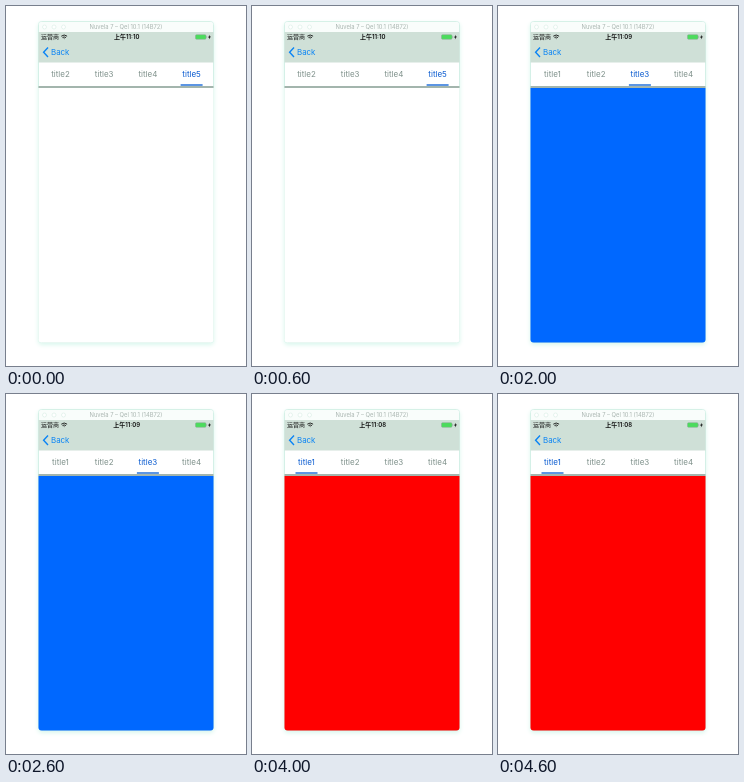
Recreate the animation shown at these times as an HTML page. Size 240 by 360 pixels, loop 5 s.

```html
<!DOCTYPE html>
<html lang="zh">
<head>
<meta charset="utf-8">
<style>
  html, body { margin: 0; width: 100%; height: 100%; overflow: hidden; background: #fff; }
  svg { display: block; width: 240px; height: 360px; font-family: Inter, "Noto Sans CJK SC", "Noto Sans CJK", sans-serif; }
  .window { fill: #fff; stroke: #cdeee2; stroke-width: .8; filter: drop-shadow(0 2px 2px #d9f7ed); }
  .title { font-size: 5.8px; fill: #a9b5b0; }
  .status { font-size: 6px; fill: #111; }
  .bold { font-weight: 600; }
  .back { font-size: 7.9px; fill: #0a84f5; }
  .tab { font-size: 8px; fill: #7f918b; }
  .tab.on { fill: #0b5cd0; }
  .mid { text-anchor: middle; }
</style>
</head>
<body>
<svg viewBox="0 0 240 360">
  <rect class="window" x="32.5" y="15.5" width="175" height="321" rx="3"/>
  <path d="M33 26V18.5q0-2.5 2.5-2.5H204.500q2.500 0 2.500 2.500V26z" fill="#f9fdfb"/>
  <g fill="#fff" stroke="#dcefe7" stroke-width=".7">
    <circle cx="38.500" cy="21" r="2"/><circle cx="48" cy="21" r="2"/><circle cx="57.500" cy="21" r="2"/>
  </g>
  <text class="title mid" x="120" y="23.300">Nuvela 7 – Qel 10.1 (14B72)</text>

  <rect x="32.500" y="26" width="175" height="30.500" fill="#cfe0d7"/>
  <text class="status" x="35" y="33.200">运营商</text>
  <g fill="none" stroke="#111" stroke-width=".9">
    <path d="M55.300 30.200q2.900-2.400 5.800 0M56.500 31.600q1.700-1.300 3.400 0"/>
    <path d="M57.500 32.500h1.400l-.7.800z" fill="#111" stroke="none"/>
  </g>
  <text class="status bold mid" id="clock" x="120.700" y="33.200"></text>
  <rect x="189.500" y="28.700" width="10.500" height="4.600" rx="1" fill="#4bdc5c" stroke="#8aa596" stroke-width=".5"/>
  <path d="M200.700 30.200v1.600" stroke="#8aa596" stroke-width=".7"/>
  <path d="M204 28.700l-2 2.700h1.300l-.4 2 2-2.800h-1.300z" fill="#111"/>
  <path d="M42 41.500L37.600 46.200 42 50.900" fill="none" stroke="#0a84f5" stroke-width="1.400"/>
  <text class="back" x="45" y="49">Back</text>

  <g id="tabs"></g>
  <rect id="mark" y="78.300" width="22" height="1.400" fill="#1769d8"/>
  <rect x="32.500" y="80" width="175" height="2" fill="#a3b5ad"/>
  <path id="page" d="M32.500 82H207.500V333.500q0 3-3 3H35.500q-3 0-3-3z"/>
</svg>
<script>
  const STEP = 1000;
  // first: number of the leftmost title; on: selected column
  const states = [
    { time: "11:10", first: 2, on: 3, color: "#fff" },
    { time: "11:11", first: 2, on: 2, color: "#722a7a" },
    { time: "11:09", first: 1, on: 2, color: "#0068ff" },
    { time: "11:09", first: 1, on: 1, color: "#00ff00" },
    { time: "11:08", first: 1, on: 0, color: "#ff0000" }
  ];
  const el = id => document.getElementById(id);
  const center = i => 54.5 + i * 43.7;
  let shown = -1;

  function draw(index) {
    const { time, first, on, color } = states[index];
    el("clock").textContent = "上午" + time;
    el("tabs").innerHTML = [0, 1, 2, 3].map(i =>
      `<text class="tab mid ${i === on ? "on" : ""}" x="${center(i)}" y="70.800">title${first + i}</text>`).join("");
    el("mark").setAttribute("x", center(on) - 11);
    el("page").setAttribute("fill", color);
  }

  const start = performance.now();
  function tick() {
    const index = Math.floor((performance.now() - start) / STEP) % states.length;
    if (index !== shown) draw(shown = index);
    requestAnimationFrame(tick);
  }
  tick();
</script>
</body>
</html>
```
